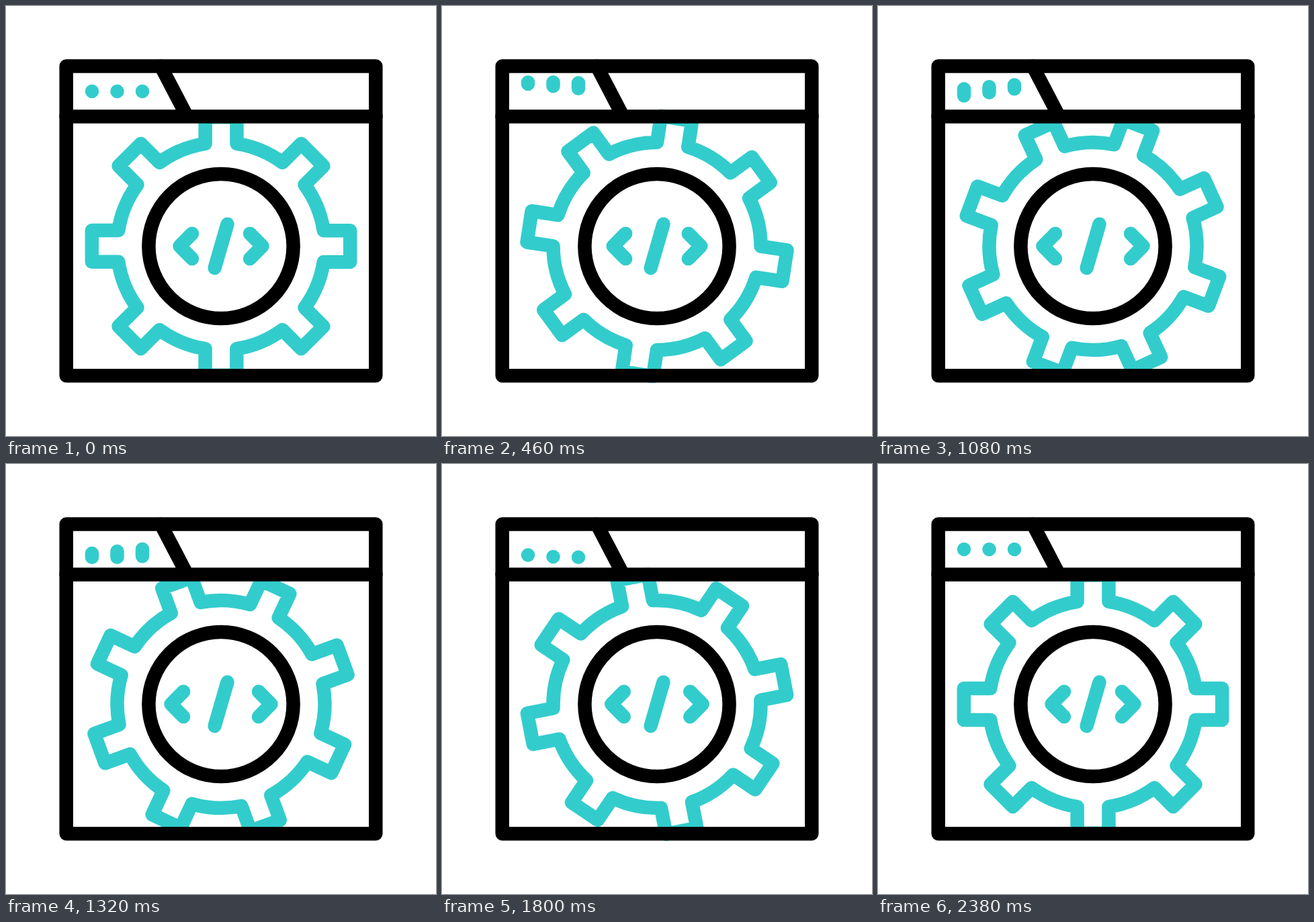
These frames come from a looping animation (640x640 px, 2400 ms). An HTML page:

```html
<!DOCTYPE html>
<html lang="en">
<head>
<meta charset="utf-8">
<title>Code settings</title>
<style>
  html, body { margin: 0; width: 100%; height: 100%; overflow: hidden; background: #fff; }
  svg { display: block; width: 100%; height: 100%; }
  g { fill: none; stroke-width: 20.5; stroke-linecap: round; stroke-linejoin: round; }
  .teal { stroke: #33cccc; }
  .ink { stroke: #000; }
</style>
</head>
<body>
<svg viewBox="0 0 640 640">
  <g class="teal">
    <path id="gear"/>
    <path id="left" d="M277 338.7L258.5 357.4L277 376.1"/>
    <path id="right" d="M363 338.7L381.5 357.4L363 376.1"/>
    <path d="M329.5 324.7L310.6 390"/>
    <path id="dots"/>
  </g>
  <g class="ink">
    <circle cx="320" cy="357.5" r="107.6"/>
    <rect x="89.7" y="89.5" width="460.6" height="460.8"/>
    <path d="M89.5 164.4H550.5M230.5 89.7L269.4 164.3"/>
  </g>
</svg>
<script>
const LOOP = 2400, LAST = 2380, CX = 320, CY = 357.5;
const $ = id => document.getElementById(id);

function gearPath() {
  const ring = 154.5, tip = 192.2, half = 23.4;
  const root = Math.sqrt(ring * ring - half * half);
  let d = '';
  for (let i = 0; i < 8; i++) {
    const a = i * Math.PI / 4, c = Math.cos(a), s = Math.sin(a);
    const at = (x, y) => `${(CX + x * c - y * s).toFixed(2)} ${(CY + x * s + y * c).toFixed(2)}`;
    d += i ? `A${ring} ${ring} 0 0 1 ` : 'M';
    d += `${at(root, -half)}L${at(tip, -half)}L${at(tip, half)}L${at(root, half)}`;
    if (i === 7) d += `A${ring} ${ring} 0 0 1 ${CX + root} ${CY - half}Z`;
  }
  return d;
}

const clamp = x => Math.max(0, Math.min(1, x));
const part = (t, from, to) => clamp((t - from) / (to - from));
const smooth = x => x * x * (3 - 2 * x);
const easeIn = x => x * x * (2 - x);

// cubic-bezier(.5, 0, .5, 1)
function swing(x) {
  let lo = 0, hi = 1;
  for (let i = 0; i < 24; i++) {
    const m = (lo + hi) / 2;
    if (1.5 * m * (1 - m) + m * m * m < x) lo = m; else hi = m;
  }
  return smooth(lo);
}

// Each dot is a short stroke whose leading end moves ahead of the trailing one.
function dot(x, t) {
  const rest = 127, rise = 13.6, fall = 25.3;
  const back = (fall - rise) * easeIn(part(t, 1660, 2000));
  const end = (up0, up1, down1) => rest - back
    - rise * smooth(part(t, up0, up1))
    + fall * smooth(part(t, 680, down1));
  const top = end(0, 360, 1610), bottom = end(130, 590, 1245);
  return `M${x} ${top.toFixed(2)}V${(bottom + 0.01).toFixed(2)}`;
}

function draw(t) {
  $('gear').setAttribute('transform', `rotate(${45 * clamp(t / LAST)} ${CX} ${CY})`);
  const shift = 13.2 * swing(clamp(1 - Math.abs(t / (LAST / 2) - 1)));
  $('left').setAttribute('transform', `translate(${-shift} 0)`);
  $('right').setAttribute('transform', `translate(${shift} 0)`);
  $('dots').setAttribute('d', [128, 165.5, 203].map((x, i) => dot(x, t - 80 * i)).join(''));
}

$('gear').setAttribute('d', gearPath());
draw(0);
const start = performance.now();
function tick() {
  draw((performance.now() - start) % LOOP);
  requestAnimationFrame(tick);
}
requestAnimationFrame(tick);
</script>
</body>
</html>
```
